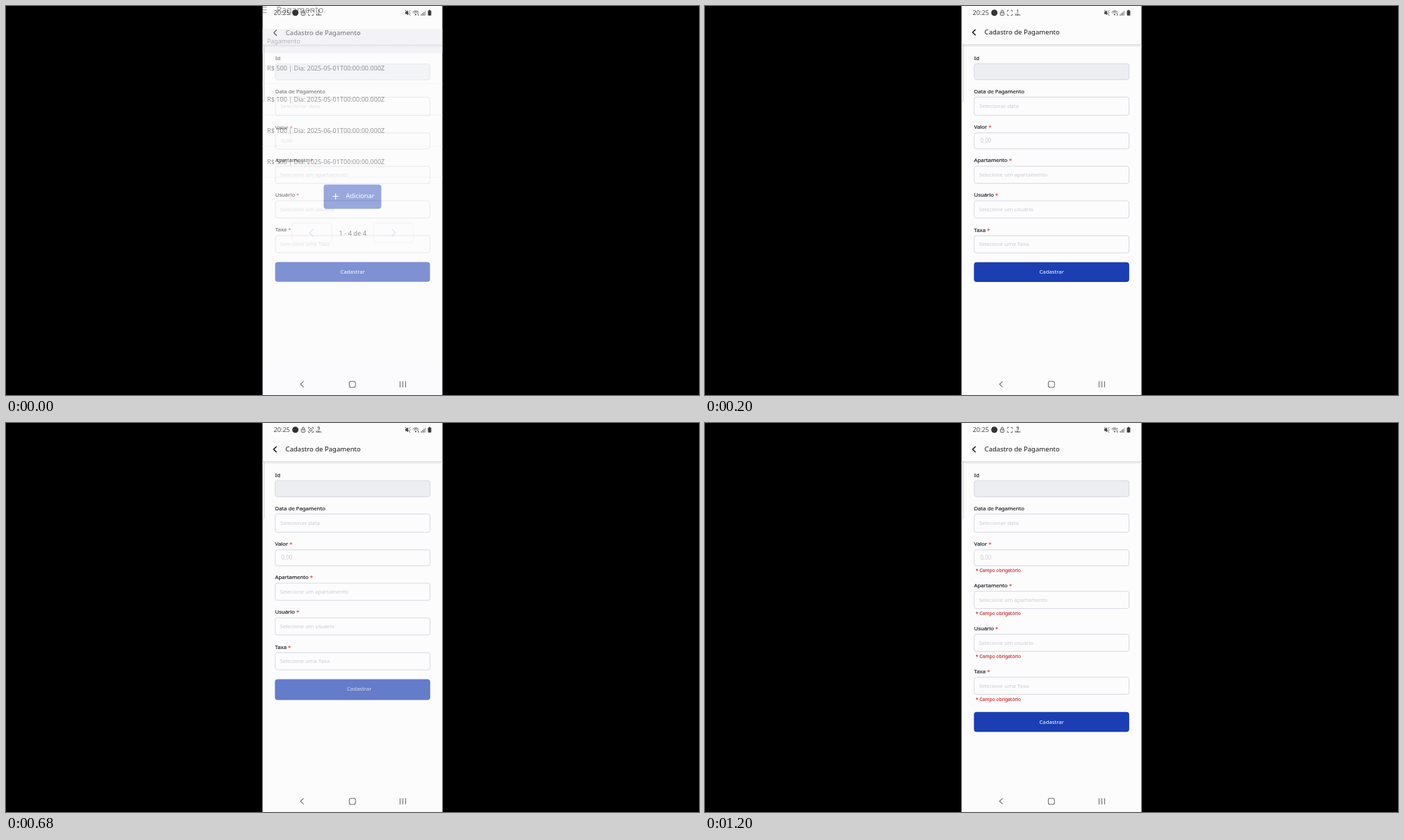
An HTML page for the animation above (1.36 s loop, 998 px wide and 561 px high).

```html
<!DOCTYPE html>
<html lang="pt-BR">
<head>
<meta charset="utf-8">
<title>Cadastro de Pagamento</title>
<style>
  html, body { margin: 0; width: 100%; height: 100%; overflow: hidden; background: #000; }
  svg { display: block; width: 998px; height: 561px; }
  text { font-family: "Noto Sans", "Open Sans", sans-serif; white-space: pre; }
  .label { fill: #1c1c20; stroke: #1c1c20; stroke-width: .18px; }
  .star { fill: #e04848; stroke: #e04848; }
  .hint { fill: #cbccd3; }
  .error { fill: #c4161f; stroke: #c4161f; stroke-width: .1px; }
  .line { fill: none; stroke-linecap: round; stroke-linejoin: round; }
</style>
</head>
<body>
<svg id="stage" viewBox="0 0 998 561">
  <defs>
    <clipPath id="phone"><rect x="369.5" width="259" height="561"/></clipPath>
    <linearGradient id="shade" x2="0" y2="1">
      <stop stop-color="#d9d9dc"/><stop offset="1" stop-color="#fcfcfd"/>
    </linearGradient>
  </defs>
  <rect width="998" height="561"/>
  <g clip-path="url(#phone)">
    <rect x="369.5" width="259" height="561" fill="#fcfcfd"/>
    <g id="list"></g>
    <g id="form"></g>
    <g id="system"></g>
  </g>
</svg>
<script>
const LOOP = 1360, STEP = 40;
const $ = id => document.getElementById(id);

const text = (x, y, size, str, attrs = 'fill="#161618"') =>
  `<text x="${x}" y="${y}" font-size="${size}" ${attrs}>${str}</text>`;
const rect = (x, y, w, h, r, attrs) =>
  `<rect x="${x}" y="${y}" width="${w}" height="${h}" rx="${r}" ${attrs}/>`;
const line = (d, color, width = 1) =>
  `<path class="line" d="${d}" stroke="${color}" stroke-width="${width}"/>`;

function buildList() {
  const rows = [['500', '05'], ['100', '05'], ['100', '06'], ['500', '06']];
  const pager = x => rect(x, 313, 57.5, 28, 5, 'fill="none" stroke="#e9e8e2"');
  return rect(369.5, 33, 259, 35, 0, 'fill="#e8e8ee"') +
    line('M366 1.5H375M366 5.5H375M366 9.5H375', '#222', 1.2) +
    text(389.5, 10.4, 12.5, 'Pagamento') +
    text(376, 53.7, 8.8, 'Pagamento', 'fill="#55555a"') +
    rows.map(([value, month], i) =>
      text(376, 93.3 + 44.9 * i, 9.1, `R$ ${value} | Dia: 2025-${month}-01T00:00:00.000Z`) +
      line(`M369.5 ${112.3 + 44.9 * i}H629`, '#e6e6ea', .8)).join('') +
    rect(457.5, 257.5, 83, 35, 4, 'fill="#1b3eb2"') +
    line('M470.8 274.5H478.6M474.7 270.6V278.4', '#fff', 1.2) +
    text(489.6, 277, 9.2, 'Adicionar', 'fill="#fff"') +
    pager(411.8) + pager(529.3) +
    line('M442 322L437.3 327L442 332', '#c9cbda', 1.5) +
    line('M556 322L560.7 327L556 332', '#c9cbda', 1.5) +
    text(499.3, 330.5, 9.25, '1 - 4 de 4', 'fill="#161618" text-anchor="middle"');
}

// label, label centre, box top, box height, hint, hint x, hint size, drop when errors show
const FIELDS = [
  ['Id', 75, 83, 23, '', 0, 8, 0],
  ['Data de Pagamento', 122.8, 131, 26.5, 'Selecionar data', 395, 7.9, 0],
  ['Valor', 174.5, 182.7, 23, '0,00', 396.5, 8, 0],
  ['Apartamento', 222.5, 230.8, 24.8, 'Selecione um apartamento', 394.4, 7.8, 11.7],
  ['Usuário', 272.6, 280.8, 24.8, 'Selecione um usuário', 394.4, 7.8, 23.6],
  ['Taxa', 322.7, 331, 24.8, 'Selecione uma Taxa', 394.4, 7.8, 35.4]
];

function buildForm() {
  const fields = FIELDS.map(([name, mid, top, h, hint, hx, hs, drop], i) => {
    const star = i > 1 ? ' <tspan class="star">*</tspan>' : '';
    const error = i > 1
      ? text(389.8, top + h + 9.7, 6.7, '* Campo obrigatório', 'class="error" visibility="hidden"') : '';
    return `<g class="field" data-drop="${drop}">` +
      text(387.5, mid + 2.8, 7.75, name + star, 'class="label"') +
      rect(387.7, top + .2, 223, h, 3, `fill="${i ? '#fcfcfd' : '#eceef1'}" stroke="#d3d4de" stroke-width=".9"`) +
      text(hx, top + h / 2 + 2.9, hs, hint, 'class="hint"') + error + '</g>';
  }).join('');
  return rect(360, -9, 278, 579, 0, 'fill="#fcfcfd"') +
    rect(369.5, 55.2, 259, 4, 0, 'fill="url(#shade)"') +
    line('M389.2 34.2L385.3 38L389.2 41.8', '#111', 1.5) +
    text(402.6, 41.2, 9.56, 'Cadastro de Pagamento') + fields +
    `<g id="button">${rect(387.3, 369.4, 223.6, 28.6, 4, 'id="plate" fill="#1b3eb2"')}` +
    text(499.2, 386.4, 7.75, 'Cadastrar', 'id="caption" fill="#fff" text-anchor="middle"') + '</g>';
}

function buildSystem() {
  const ink = '#4a4a4d', nav = '#707074';
  const arc = r => `M${590 - r} ${13 - r}Q590 ${11.2 - r * 1.5} ${590 + r} ${13 - r}`;
  const bars = [0, 1, 2, 3].map(i =>
    rect(597.4 + 2 * i, 11.8 - 1.7 * i, 1.3, 2 + 1.7 * i, 0, `fill="${i < 3 ? '#77777a' : '#b5b5b8'}"`)).join('');
  return text(385.5, 13.3, 9.2, '20:25', `fill="${ink}"`) +
    `<circle cx="416.7" cy="9.8" r="4.5" fill="#333"/>` +
    rect(425.4, 9, 5.2, 4.4, .8, `fill="none" stroke="${ink}" stroke-width=".9"`) +
    line('M426.5 9V7.7Q426.5 6 428 6T429.5 7.7V9', ink, .9) +
    line('M428 10.8V11.6', ink, .9) +
    line('M435.6 8V6.3H437.3M440.7 6.3H442.4V8M442.4 11.8V13.5H440.7M437.3 13.5H435.6V11.8', ink, .8) +
    `<circle id="lens" cx="439" cy="9.9" r="1.8" fill="none" stroke="${ink}" stroke-width=".9"/>` +
    text(450.3, 10, 6.6, '1', `id="rate" fill="${ink}" stroke="${ink}" stroke-width=".2" text-anchor="middle"`) +
    text(450.3, 14, 3.7, 'KB/s', `fill="${ink}" stroke="${ink}" stroke-width=".15" text-anchor="middle"`) +
    `<path d="M575 8.3H576.6L579 6.2V13.3L576.6 11.5H575Z" fill="${ink}"/>` +
    line('M575.2 6L582 13.6M580.5 8L582 6.5M580.8 10H582.2', ink, .9) +
    line(arc(4.2) + arc(2.7), ink, .9) +
    `<circle cx="590" cy="12.3" r="1.1" fill="${ink}"/>` +
    line('M593.7 11V13.6', ink, .9) + bars +
    rect(607.6, 6.6, 4.8, 7.2, .8, 'fill="#3a3a3d"') +
    rect(609, 5.7, 2, 1.2, 0, 'fill="#3a3a3d"') +
    line('M369 55.5H370Q371.8 55.5 371.8 58V136Q371.8 138.5 370 138.5', '#cbcbcf', .9) +
    line('M428.3 541.6L424.2 545.5L428.3 549.4', nav, 1.1) +
    rect(494.4, 541.2, 8.9, 8.8, 2.6, `fill="none" stroke="${nav}" stroke-width="1.1"`) +
    line('M567.5 541.6V549.6M571.5 541.6V549.6M575.5 541.6V549.6', nav, 1.1);
}

// value of a [time, value] track, linear between entries
function track(points, t) {
  const i = points.findIndex(p => p[0] > t);
  if (i < 0) return points[points.length - 1][1];
  if (!i) return points[0][1];
  const [a, u] = points[i - 1], [b, v] = points[i];
  return u + (v - u) * (t - a) / (b - a);
}

const FADE = [[0, .56], [40, .62], [80, .76], [120, .88], [160, .96], [200, 1]];
const ZOOM = [[0, .9976], [40, .9995], [80, 1]];
const PRESS = [[560, 1], [600, .86], [640, .72], [680, .67], [720, .67], [760, .75], [800, .88], [840, .97], [880, 1]];

$('list').innerHTML = buildList();
$('form').innerHTML = buildForm();
$('system').innerHTML = buildSystem();
const fields = [...document.querySelectorAll('.field')];
const errors = [...document.querySelectorAll('.error')];

const scaled = s => `translate(499 280.5) scale(${s}) translate(-499 -280.5)`;

function draw(t) {
  const failed = t >= 760, loading = t >= 640 && !failed;
  $('list').setAttribute('transform', scaled(t < STEP ? 1 : 1.002));
  $('list').setAttribute('visibility', t < 200 ? 'visible' : 'hidden');
  $('form').setAttribute('opacity', track(FADE, t));
  $('form').setAttribute('transform', scaled(track(ZOOM, t)));
  fields.forEach(f => f.setAttribute('transform', `translate(0 ${failed ? f.dataset.drop : 0})`));
  errors.forEach(e => e.setAttribute('visibility', failed ? 'visible' : 'hidden'));
  $('button').setAttribute('transform', `translate(0 ${failed ? 47.4 : 0})`);
  $('button').setAttribute('opacity', track(PRESS, t));
  $('plate').setAttribute('height', loading ? 30 : 28.6);
  $('caption').setAttribute('x', loading ? 508.7 : 499.2);
  $('caption').setAttribute('opacity', loading ? .75 : 1);
  $('lens').setAttribute('visibility', t >= 320 && t < 1200 ? 'visible' : 'hidden');
  $('rate').textContent = t < 600 ? '1' : '9';
}

const start = performance.now();
function tick() {
  const t = (performance.now() - start) % LOOP;
  draw(Math.floor(t / STEP) * STEP);
  requestAnimationFrame(tick);
}
draw(0);
requestAnimationFrame(tick);
</script>
</body>
</html>
```
